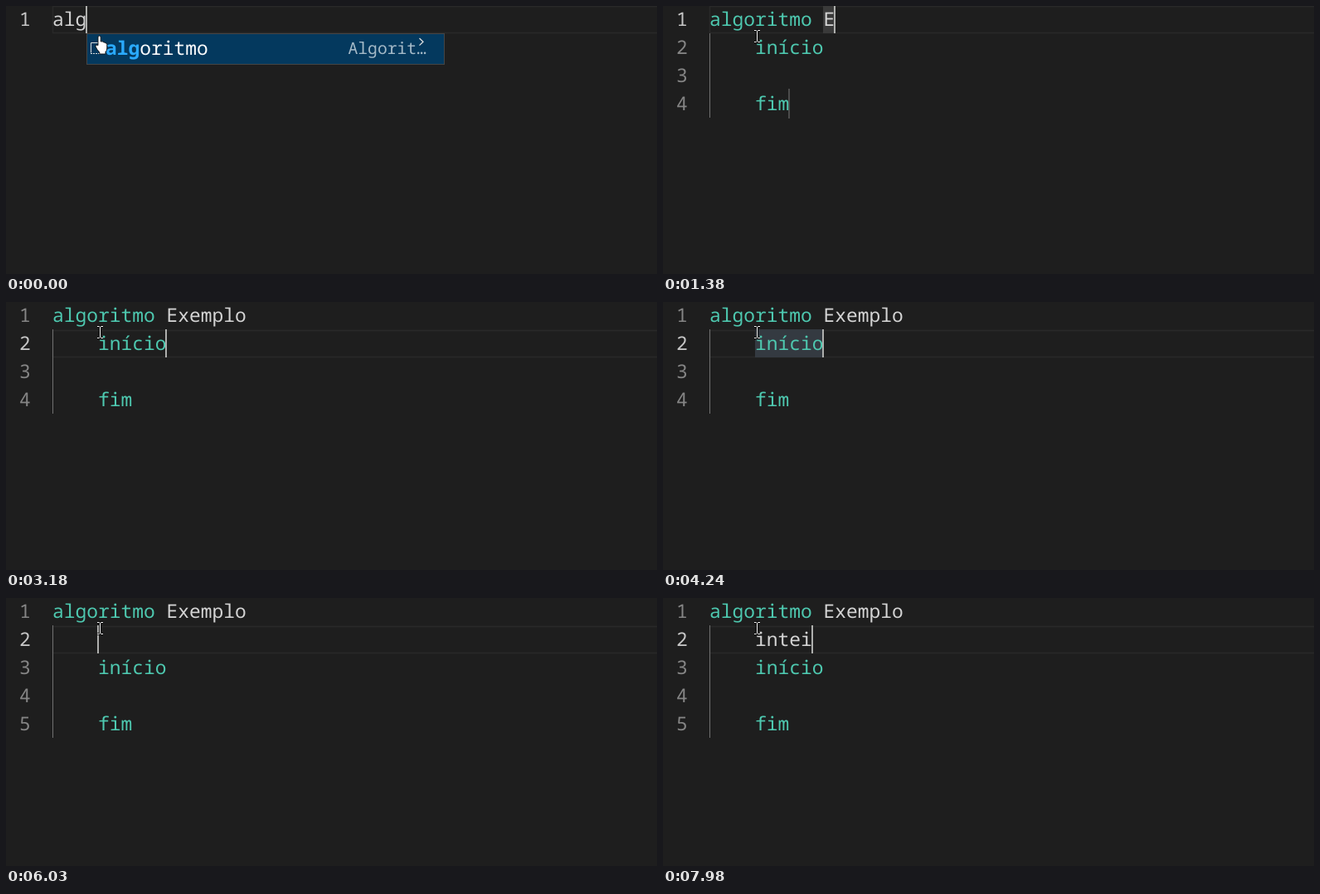
Recreate the animation shown at these times as an HTML page. Size 785 by 324 pixels, loop 8 s.

```html
<!DOCTYPE html>
<html lang="pt">
<head>
<meta charset="utf-8">
<title>Editor</title>
<style>
  html, body { margin: 0; width: 100%; height: 100%; overflow: hidden; background: #1e1e1e; }
  svg { display: block; }
  text {
    font: 22.91px "Noto Sans Mono", "DejaVu Sans Mono", monospace;
    text-rendering: geometricPrecision;
    white-space: pre;
  }
  .match { fill: #2aaaff; font-weight: 700; }
  .detail { font-size: 19.7px; font-weight: 500; }
  .abc { font: 700 9px "Open Sans", sans-serif; }
</style>
</head>
<body>
<svg id="stage" width="785" height="324" viewBox="0 0 785 324"></svg>
<script>
const LOOP = 8000, CHAR = 13.745, LEFT = 56, ROW = 34;
const TEAL = '#4ec9b0', PLAIN = '#d4d4d4', BLUE = '#9cdcfe', WORD = '#343a41', FIELD = '#3a3a3a';

// Each step changes only the listed parts of the editor state.
const steps = [
  [0, { row: 0, col: 3, on: true, popup: 'snippet', mouse: 'hand' }],
  [150, { name: 'Nome', col: 14, mark: '#264f78', end: true, popup: null, mouse: 'beam' }],
  [680, { on: false }],
  [1130, { on: true }],
  [1380, { name: 'E', col: 11, mark: FIELD }],
  [1630, { name: 'Ex', col: 12 }],
  [1750, { name: 'Exe', col: 13 }],
  [1880, { name: 'Exem', col: 14 }],
  [2000, { name: 'Exemp', col: 15 }],
  [2140, { name: 'Exempl', col: 16 }],
  [2410, { name: 'Exemplo', col: 17 }],
  [2790, { on: false }],
  [3180, { row: 1, col: 10, on: true, mark: null, end: false }],
  [3600, { wordMark: true }],
  [3730, { on: false }],
  [4240, { on: true }],
  [4400, { row: 0, col: 17, wordMark: false }],
  [4680, { mark: WORD }],
  [4960, { row: 1, col: 0, mark: null, typed: '' }],
  [5470, { on: false }],
  [5620, { col: 1, on: true }],
  [5770, { col: 2 }],
  [5890, { col: 3 }],
  [6030, { col: 4 }],
  [6540, { col: 5, typed: 'i' }],
  [6660, { popup: 'word' }],
  [6810, { col: 6, typed: 'in', ink: BLUE }],
  [7330, { on: false }],
  [7700, { col: 7, on: true, typed: 'int', ink: PLAIN, popup: null }],
  [7830, { col: 8, typed: 'inte' }],
  [7980, { col: 9, typed: 'intei' }]
];

let state = {};
const states = steps.map(([time, change]) => state = { ...state, ...change, time });

const colX = col => LEFT + col * CHAR;
const caretX = col => Math.max(LEFT, Math.round(colX(col) - 1));
const rect = (x, y, w, h, fill) =>
  `<rect x="${x}" y="${y}" width="${w}" height="${h}" fill="${fill}"/>`;
const text = (x, y, str, fill, cls = '') =>
  `<text x="${x}" y="${y}" fill="${fill}" class="${cls}">${str}</text>`;
const code = (row, col, str, fill) => text(colX(col), 24 + row * ROW, str, fill);
const band = (row, col, len, fill) =>
  rect(Math.round(colX(col)), row * ROW - 1, Math.round(len * CHAR), ROW, fill);

function popup({ popup: kind, row, col, typed }) {
  const x = caretX(col) + 1, y = (row + 1) * ROW - 1;
  const [match, rest] = kind === 'snippet'
    ? ['alg', 'oritmo']
    : [typed, 'início'.slice(typed.length)];
  const box = `<rect x="${x + .5}" y="${y + .5}" width="431" height="37" fill="#04395e" stroke="#454545"/>`;
  const label = text(x + 23, y + 26, `<tspan class="match">${match}</tspan>${rest}`, '#fff');
  if (kind === 'word') return box + label + text(x + 3, y + 21, 'abc', '#e8e8e8', 'abc');
  return box + label
    + `<path d="M${x + 15} ${y + 11.5}h-9.5v12" fill="none" stroke="#ddd"/>`
    + `<path d="M${x + 5} ${y + 24.5}h11" stroke="#ddd" stroke-dasharray="2 1"/>`
    + text(x + 315.5, y + 25, 'Algorit…', '#a5bac8', 'detail')
    + `<path d="M${x + 401.5} ${y + 6}l4.5 4.3l-4.5 4.3" fill="none" stroke="#e0e0e0" stroke-width="1.3"/>`;
}

const pointers = {
  hand: `<path d="M111 47.5V38q0-2 1.6-2t1.6 2v5q3-.7 3.4 1q2.2-.5 2.6 1q1.6-.2 1.6 1.6V51
    q0 3-1.8 4.5V58h-7.2v-2q-3.6-3.8-4.8-7q-.3-2 1.3-1.8z" fill="#fff" stroke="#111" stroke-width=".9"/>`,
  beam: ['#000', '#fff'].map((color, i) =>
    `<path d="M110 29.5h2.5l1 1l1-1h2.5M113.5 30v13M110 43.5h2.5l1-1l1 1h2.5"
      fill="none" stroke="${color}" stroke-width="${i ? 1 : 2.4}"/>`).join('')
};

function draw(s) {
  const extra = s.typed === undefined ? 0 : 1;
  const started = s.name !== undefined;
  const rows = started ? 4 + extra : 1;
  const top = s.row * ROW;
  let out = `<rect x="56.5" y="${top + .5}" width="740" height="32" fill="none" stroke="#292929" stroke-width="1.5"/>`;

  if (s.mark) out += band(0, 10, s.name.length, s.mark);
  if (s.wordMark) out += band(1, 4, 6, WORD);
  if (started) out += rect(LEFT, 33, 1, (rows - 1) * ROW, '#707070');
  if (s.end) out += rect(caretX(7), 100, 2, 36, '#4c4c4c');

  for (let i = 0; i < rows; i++)
    out += text(16, 24 + i * ROW, i + 1, i === s.row ? '#c6c6c6' : '#858585');

  if (started) {
    out += code(0, 0, 'algoritmo', TEAL) + code(0, 10, s.name, PLAIN)
      + code(1 + extra, 4, 'início', TEAL) + code(3 + extra, 4, 'fim', TEAL);
    if (s.typed) out += code(1, 4, s.typed, s.ink || PLAIN);
  } else {
    out += code(0, 0, 'alg', PLAIN);
  }

  if (s.on) out += rect(caretX(s.col), Math.max(0, top - 1), 2, top ? 34 : 33, '#aeafad');
  if (s.popup) out += popup(s);
  return out + pointers[s.mouse];
}

const stage = document.getElementById('stage');
const start = performance.now();
let shown;

function tick() {
  const time = (performance.now() - start) % LOOP;
  const current = states.findLast(s => s.time <= time) || states[0];
  if (current !== shown) stage.innerHTML = draw(shown = current);
  requestAnimationFrame(tick);
}
tick();
</script>
</body>
</html>
```
